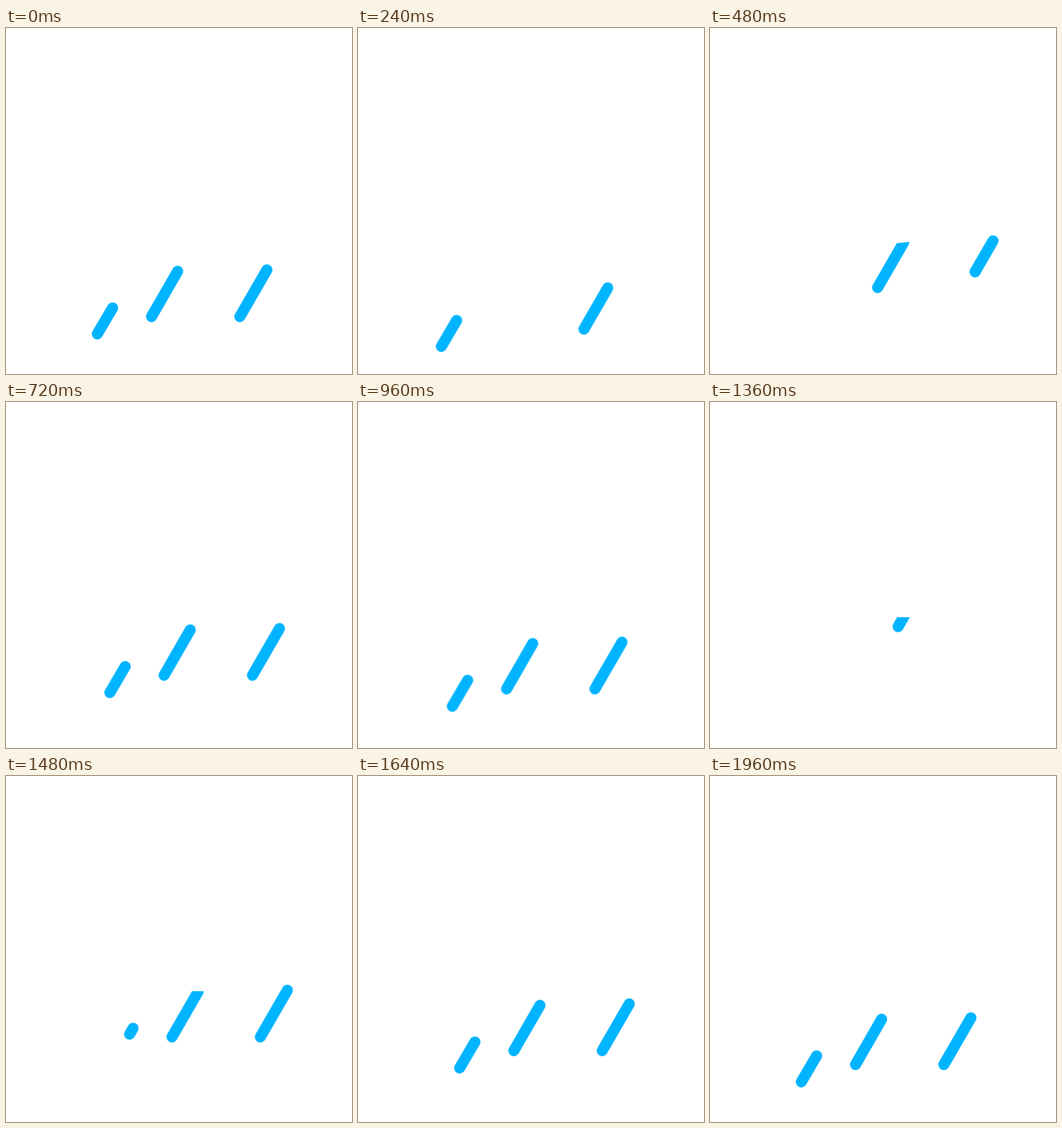
Recreate the animation shown at these times as an HTML page without scripts. Size 500 by 500 pixels, loop 2 s.

```html
<!DOCTYPE html>
<html lang="en">
<head>
<meta charset="utf-8">
<title>Rain</title>
<style>
  html, body { margin: 0; width: 100%; height: 100%; overflow: hidden; background: #fff; }
  svg { display: block; width: 100%; height: 100%; }

  .rain { animation: fall 2s linear infinite; }
  .drop {
    stroke: #00b4ff;
    stroke-width: 16;
    stroke-linecap: round;
    stroke-dasharray: 1 2;
    animation: trim 2s linear infinite;
    animation-delay: var(--delay, 0s);
  }
  .cloud {
    fill: #fff;
    transform-origin: 279px 310px;
    animation: tilt 2s step-end infinite;
  }

  /* Shared drift of all drops, settling at the loop point */
  @keyframes fall {
    0% { transform: translate(0, 0); animation-timing-function: cubic-bezier(.3, .1, .7, .75); }
    12% { transform: translate(-11.5px, 18px); }
    18.2% { transform: translate(-18px, 27px); }
    18.3% { transform: translate(38.5px, -51.4px); }
    60% { transform: translate(-9.3px, 17.3px); }
    66% { transform: translate(-9.3px, 17.3px); }
    66.1% { transform: translate(44px, -60px); }
    68% { transform: translate(40px, -55px); }
    72% { transform: translate(33.3px, -45px); }
    82% { transform: translate(15px, -20.3px); animation-timing-function: cubic-bezier(.33, .67, .67, 1); }
    98%, 100% { transform: translate(0, 0); }
  }

  /* Each drop grows from its top, then shrinks into its tip */
  @keyframes trim {
    0%, 8.4% { stroke-dashoffset: 0; }
    11.4%, 18.74% { stroke-dashoffset: -1.01; }
    18.75% { stroke-dashoffset: 1.01; }
    21.75%, 50% { stroke-dashoffset: 0; }
    53%, 66.74% { stroke-dashoffset: -1.01; }
    66.75% { stroke-dashoffset: 1.01; }
    69.75%, 100% { stroke-dashoffset: 0; }
  }

  @keyframes tilt {
    0% { transform: rotate(-6deg); }
    62%, 100% { transform: translateY(1px); }
  }
</style>
</head>
<body>
<svg viewBox="0 0 500 500">
  <g class="rain">
    <path class="drop" pathLength="1" d="M248 351.5 210.3 417"/>
    <path class="drop" pathLength="1" d="M377 349.5 338 417" style="--delay: -1.934s"/>
    <path class="drop" pathLength="1" d="M154 404.5 132 442" style="--delay: -1.868s"/>
  </g>
  <rect class="cloud" x="244" y="270" width="80" height="40"/>
</svg>
</body>
</html>
```
